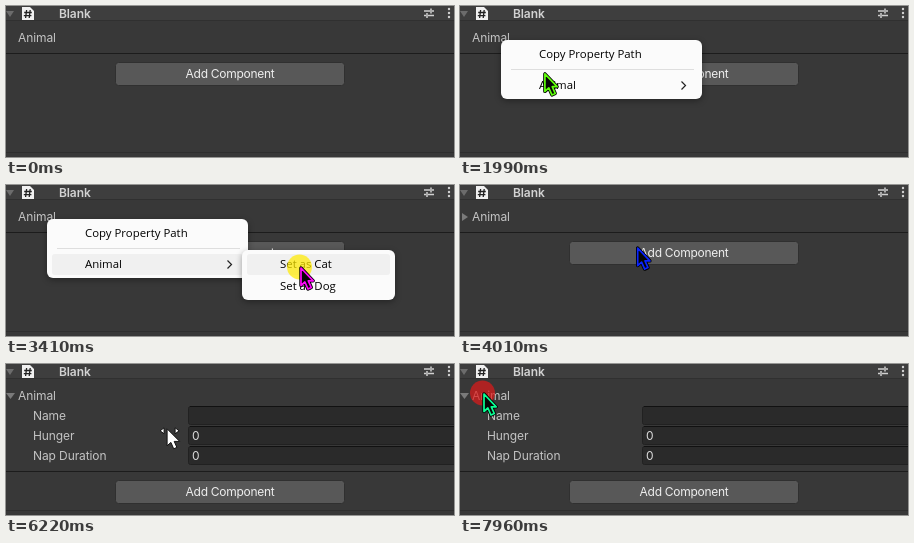
Recreate the animation shown at these times as an HTML page. Size 448 px wide and 151 px high, loop 8 s.

```html
<!DOCTYPE html>
<html lang="en">
<head>
<meta charset="utf-8">
<title>Inspector context menu</title>
<style>
  html, body { margin: 0; width: 100%; height: 100%; overflow: hidden; background: #383838; }
  svg { display: block; width: 448px; height: 151px; }
  text { font: 12px Inter, Roboto, sans-serif; fill: #c4c4c4; letter-spacing: -.1px; }
  .title { font-weight: 600; fill: #d2d2d2; }
  .button text { fill: #eee; text-anchor: middle; letter-spacing: -.28px; }
  .menu text { font: 11.4px "Open Sans", "Noto Sans", sans-serif; fill: #000; letter-spacing: 0; }
  .panel { fill: #fbfbfb; filter: drop-shadow(0 2px 3px rgba(0,0,0,.35)); }
  .hover { fill: #f0f0f0; }
  .icon { fill: none; stroke: #d0d0d0; stroke-width: 1.5; }
  .field { fill: #2a2a2a; stroke: #212121; }
  .value { fill: #dcdcdc; }
  .arrow { stroke-linejoin: round; }
</style>
</head>
<body>
<svg viewBox="0 0 448 151">
  <rect width="448" height="151" fill="#383838"/>
  <rect width="448" height="14" fill="#3e3e3e"/>
  <rect y="14" width="448" height="1" fill="#303030"/>
  <path d="M0 5h8l-4 6z" fill="#6c6c6c"/>
  <path d="M16 1h8l4 4v9h-12z" fill="#f1f1f1"/>
  <path d="M20.6 4l-1 8M24.2 4l-1 8M18.2 6.5h7.6M17.8 9.7h7.6" fill="none" stroke="#222" stroke-width="1.3"/>
  <text class="title" x="53" y="12">Blank</text>
  <path class="icon" d="M418 5h6M426 5h2M425 2.5v5M418 9.5h2M422 9.5h6M421 7v5"/>
  <path d="M443 3h0M443 7h0M443 11h0" stroke="#d0d0d0" stroke-width="2.4" stroke-linecap="round"/>
  <text x="12" y="36">Animal</text>
  <path id="fold" fill="#7a7a7a"/>
  <g id="fields"></g>

  <g id="lower" class="button">
    <rect y="47" width="448" height="1" fill="#1c1c1c"/>
    <rect x="109.5" y="56.5" width="229" height="23" rx="3" fill="#585858" stroke="#303030"/>
    <text x="224" y="72.3">Add Component</text>
  </g>
  <rect y="146" width="448" height="1" fill="#2e2e2e"/>

  <g id="menu" class="menu">
    <rect class="panel" x="41" y="34" width="201" height="59" rx="6"/>
    <path d="M51 63.5h183" stroke="#dedede"/>
    <rect id="parent" class="hover" x="46" y="69" width="191" height="21" rx="3"/>
    <text x="79" y="52">Copy Property Path</text>
    <text x="79" y="83">Animal</text>
    <path d="M221.5 75.5l4 4-4 4" fill="none" stroke="#222" stroke-width="1.2"/>
  </g>
  <g id="submenu" class="menu">
    <rect class="panel" x="236" y="65" width="153" height="50" rx="6"/>
    <rect id="item" class="hover" x="241" y="69" width="143" height="21" rx="3"/>
    <text x="274" y="83">Set as Cat</text>
    <text x="274" y="105">Set as Dog</text>
  </g>

  <circle id="click" r="12.5" opacity=".72"/>
  <g id="arrow" class="arrow">
    <path id="shape" d="M1 1V18.5L4.9 15L8 22L11.3 20.5L8.3 13.8H13.2Z" stroke="#000" stroke-width="3.4"/>
    <use href="#shape" id="rim"/>
    <path id="edge" d="M1 1V18.5L4.9 15L8 22L11.3 20.5L8.3 13.8H13.2Z" fill="#060606" stroke-width="1.7"/>
  </g>
  <g id="drag" class="arrow" fill="#fff" stroke="#111">
    <path d="M-7 1l4-3v6zM12 1l-4-3v6z"/>
    <path d="M0-1V16L3.8 12.6L6.6 19L9.8 17.6L7.1 11.6H12.6Z"/>
  </g>
</svg>
<script>
const LOOP = 8000, START = 278, STEP = 100.7, GLIDE = 580;
const OPEN = 1380, SUB = 2480, PICK = 3490, EXPAND = 4680;
const RED = "#dc1a1a", YELLOW = "#ffea00";
const $ = id => document.getElementById(id);

// glide start, x, y
const MOVES = [
  [330, 44, 40], [1430, 84, 67], [1990, 225, 78], [2750, 294, 82],
  [3750, 6, 33], [5260, 159, 66], [6190, 449, 42], [6740, 440, 62], [7140, 23, 29]
];
// press, release, colour
const CLICKS = [
  [1080, OPEN, RED], [3280, PICK, YELLOW], [4580, 4780, YELLOW], [7700, LOOP, RED]
];

const clamp = v => Math.min(1, Math.max(0, v));
const ramp = (t, from, span) => clamp((t - from) / span);
const ease = p => p * p * (3 - 2 * p);
const show = (el, on) => { el.style.display = on ? "" : "none"; };

function cursorAt(t) {
  let x = 123, y = 116;
  for (const [from, toX, toY] of MOVES) {
    const p = ease(ramp(t, from, GLIDE));
    x += (toX - x) * p;
    y += (toY - y) * p;
  }
  return [x, y];
}

$("rim").remove();
$("fields").innerHTML = ["Name", "Hunger", "Nap Duration"].map((name, i) => {
  const y = 42 + 20 * i;
  return `<text x="27" y="${y + 14}">${name}</text>
    <rect class="field" x="182.5" y="${y + .5}" width="270" height="18" rx="2"/>
    <path d="M184 ${y + .5}h264" stroke="#111"/>
    ${i ? `<text class="value" x="186" y="${y + 14}">0</text>` : ""}`;
}).join("");

function draw(time) {
  const t = time < START ? 0 : START + Math.floor((time - START) / STEP) * STEP;
  const open = t >= EXPAND;

  show($("fields"), open);
  $("lower").setAttribute("transform", `translate(0 ${open ? 60 : 0})`);
  show($("fold"), t >= PICK);
  $("fold").setAttribute("d", open ? "M0 29h9l-4.5 6z" : "M2 28l6 4-6 4z");

  const fade = 1 - ramp(t, PICK - 10, 200);
  $("menu").style.opacity = ramp(t, OPEN - 100, 200) * fade;
  $("submenu").style.opacity = ramp(t, SUB - 100, 200) * fade;
  show($("parent"), t >= 2080);
  show($("item"), t >= 3000);

  const [x, y] = cursorAt(t);
  const click = CLICKS.find(([from, to]) => t >= from && t < to);
  show($("click"), click);
  if (click) {
    $("click").setAttribute("fill", click[2]);
    $("click").setAttribute("transform", `translate(${x - .5} ${y})`);
  }

  // the pointer turns into a drag handle over the field labels
  const seen = t >= START && (t < 6720 || t >= 7120);
  const drag = open && t < 6720 && x > 25 && x < 182 && y > 42;
  show($("arrow"), seen && !drag);
  show($("drag"), seen && drag);
  for (const id of ["arrow", "drag"])
    $(id).setAttribute("transform", `translate(${x.toFixed(1)} ${y.toFixed(1)})`);
  $("edge").setAttribute("stroke", `hsl(${322 - .112 * t} 100% 52%)`);
}

const begin = performance.now();
function frame() {
  draw((performance.now() - begin) % LOOP);
  requestAnimationFrame(frame);
}
frame();
</script>
</body>
</html>
```
